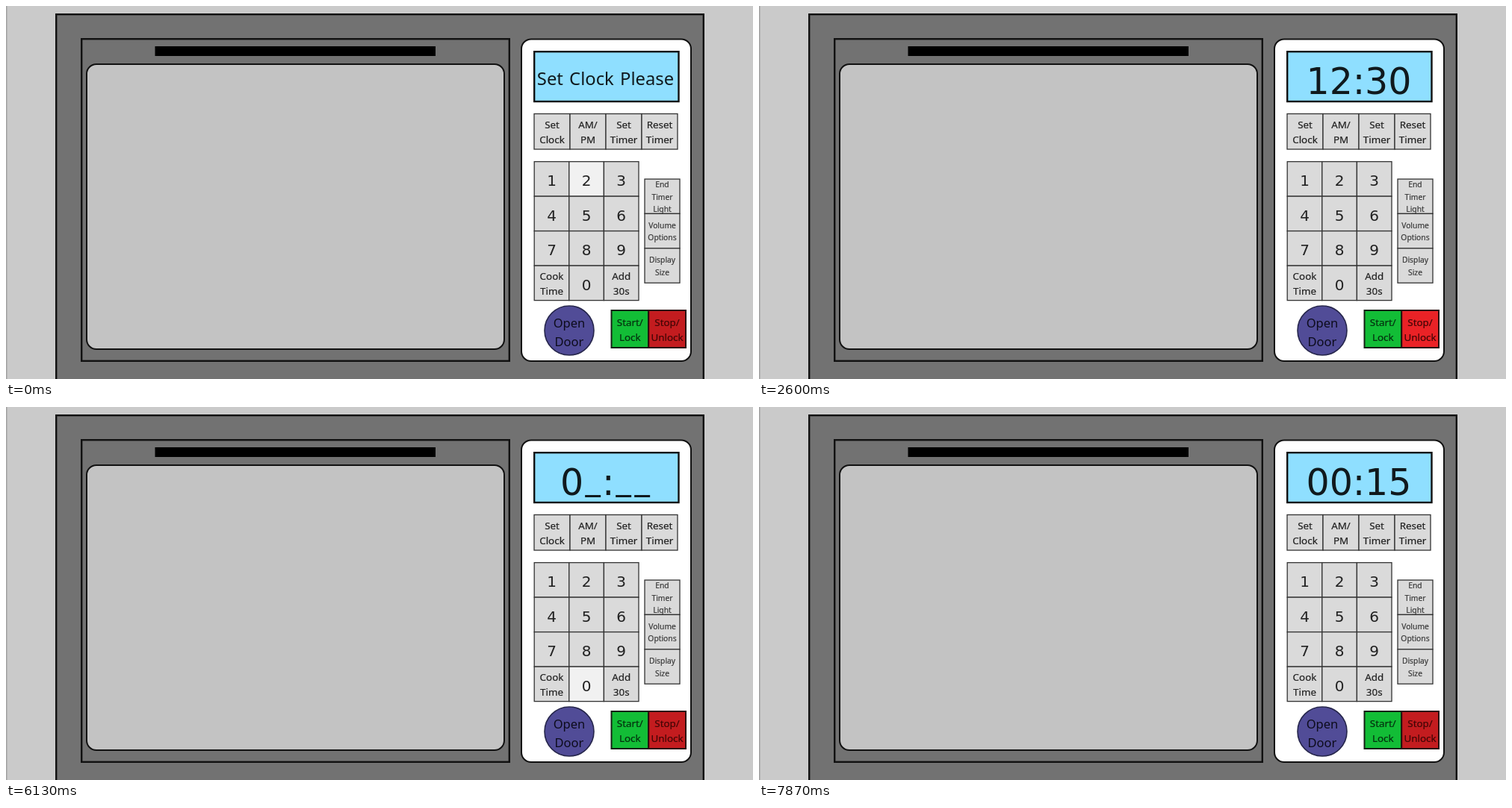
An HTML page that plays this animation: 1000x500 px, repeating every 8000 ms.

```html
<!DOCTYPE html>
<html lang="en">
<head>
<meta charset="utf-8">
<title>Microwave panel</title>
<style>
html, body { margin: 0; width: 100%; height: 100%; overflow: hidden; background: #cacaca; }
svg { display: block; width: 1000px; height: 500px; }
text { text-anchor: middle; font-family: "Noto Sans", "Open Sans", sans-serif; fill: #222; }
.num { font-family: "DejaVu Sans", sans-serif; }
#screen text { fill: #10191d; }
</style>
</head>
<body>
<svg id="stage" viewBox="0 0 1000 500">
  <rect width="1000" height="500" fill="#cacaca"/>
  <rect width="1.5" height="500" fill="#a2a2a2"/>
  <g stroke="#111" stroke-width="2.4">
    <rect x="67.2" y="11.2" width="866.6" height="500" fill="#727272"/>
    <rect x="101.2" y="44.2" width="572.6" height="431.6" fill="#727272"/>
    <rect x="108" y="78" width="559" height="382" rx="13" fill="#c3c3c3" stroke-width="2"/>
    <rect x="690" y="44.5" width="227" height="431.5" rx="13" fill="#fff" stroke-width="2"/>
    <rect x="707.2" y="61.2" width="193.3" height="66.8" fill="#8fdfff"/>
  </g>
  <rect x="199.5" y="54" width="375.5" height="13" fill="#000"/>
  <g id="keys"></g>
  <g id="screen"></g>
</svg>
<script>
const NS = "http://www.w3.org/2000/svg";
const LOOP = 8000;
const keysG = document.getElementById("keys");
const screenG = document.getElementById("screen");
const keys = {};

function add(parent, tag, attrs, content) {
  const el = document.createElementNS(NS, tag);
  for (const k in attrs) el.setAttribute(k, attrs[k]);
  if (content) el.textContent = content;
  parent.appendChild(el);
  return el;
}

function label(parent, str, x, y, size, extra) {
  return add(parent, "text", { x, y, "font-size": size, ...extra }, str);
}

// Each key keeps its idle and hover fill; the name is its label without spaces.
function key(str, x, y, w, h, opt = {}) {
  const { size = 13.4, gap = 20, base = 0, idle = "#dadada", lit = "#f1f1f1",
    ink = "#222", edge = "#333", line = 1.3, cls = "" } = opt;
  const shape = add(keysG, "rect", { x, y, width: w, height: h, fill: idle, stroke: edge, "stroke-width": line });
  const lines = str.split(" ");
  lines.forEach((s, i) => {
    const dy = (i - (lines.length - 1) / 2) * gap;
    label(keysG, s, x + w / 2, y + h / 2 + dy + size * 0.37 + base, size,
      { class: cls, style: `fill:${ink};stroke:${ink};stroke-width:${cls ? 0 : 0.2}` });
  });
  keys[lines.join("")] = { shape, idle, lit };
}

["Set Clock", "AM/ PM", "Set Timer", "Reset Timer"].forEach((s, i) =>
  key(s, 707 + i * 48, 144.5, 48, 47.5, { base: 0.8 }));

["1", "2", "3", "4", "5", "6", "7", "8", "9", "Cook Time", "0", "Add 30s"].forEach((s, i) => {
  const x = 707.2 + (i % 3) * 46.6, y = 208.6 + Math.floor(i / 3) * 46.5;
  key(s, x, y, 46.6, 46.5, s.length > 1 ? { base: 1 } : { size: 20, base: 2, cls: "num" });
});

["End Timer Light", "Volume Options", "Display Size"].forEach((s, i) =>
  key(s, 855, 232 + i * 46.4, 47, 46.4, { size: 10.3, gap: 16.4, base: 0.7, ink: "#3a3a3a" }));

add(keysG, "circle", { cx: 754, cy: 435, r: 33, fill: "#514c97", stroke: "#26264c", "stroke-width": 1.6 });
label(keysG, "Open", 754, 430.5, 16.5, { style: "fill:#0d0c1c" });
label(keysG, "Door", 754, 455.5, 16.5, { style: "fill:#0d0c1c" });

const pair = { base: 1.5, line: 2 };
key("Start/ Lock", 810.5, 408, 49.7, 50, { ...pair, idle: "#12bd36", lit: "#18e844", ink: "#05300f", edge: "#142014" });
key("Stop/ Unlock", 860.2, 408, 49.8, 50, { ...pair, idle: "#c31c1f", lit: "#ea2226", ink: "#430707", edge: "#2a0e0e" });

// [start time, value]
const hovers = [
  [0, "2"], [70, ""], [130, "SetClock"], [470, "1"], [870, "2"], [1270, "3"],
  [1870, "6"], [1930, "9"], [2000, "8"], [2070, "0"],
  [2470, "Add30s"], [2530, "Start/Lock"], [2600, "Stop/Unlock"], [2870, "Start/Lock"],
  [3470, "Stop/Unlock"], [3530, ""], [3600, "DisplaySize"], [3670, "VolumeOptions"],
  [3730, "EndTimerLight"], [3800, "3"], [4330, "CookTime"], [5130, "0"],
  [6870, "8"], [7000, "5"], [7070, "2"], [7130, "1"],
  [7400, "4"], [7470, "5"], [7670, "8"], [7730, "9"], [7800, "Add30s"], [7870, ""]
];
const screens = [
  [0, "Set Clock Please"], [270, "__:__"], [730, "1_:__"], [1070, "12:__"],
  [1670, "12:3_"], [2330, "12:30"], [3070, "12:30 AM"], [4930, "__:__"],
  [6070, "0_:__"], [6470, "00:__"], [7270, "00:1_"], [7600, "00:15"]
];

function at(track, t) {
  let v = track[0][1];
  for (const [start, value] of track) if (t >= start) v = value;
  return v;
}

function drawDigits(str) {
  const advance = c => c === "_" ? 25 : c === ":" ? 16 : 31.3;
  let x = 803 - [...str].reduce((sum, c) => sum + advance(c), 0) / 2;
  for (const c of str) {
    const w = advance(c);
    if (c === "_") add(screenG, "rect", { x: x + 2, y: 118, width: 21, height: 3, fill: "#10191d" });
    else label(screenG, c, x + w / 2, 118.2, 49, { class: "num" });
    x += w;
  }
}

function drawScreen(str) {
  screenG.textContent = "";
  if (str.startsWith("Set")) {
    label(screenG, str, 802.5, 105.8, 23.8, { "word-spacing": 2 });
  } else if (str.endsWith("AM")) {
    label(screenG, str.slice(0, 5), 764, 113, 36.5, { class: "num" });
    label(screenG, "AM", 866, 113, 36, { class: "num" });
  } else {
    drawDigits(str);
  }
}

let shownText = null;
function render(t) {
  const hover = at(hovers, t), str = at(screens, t);
  for (const name in keys) {
    const k = keys[name];
    k.shape.setAttribute("fill", name === hover ? k.lit : k.idle);
  }
  if (str !== shownText) drawScreen(shownText = str);
}

const began = performance.now();
function tick() {
  render((performance.now() - began) % LOOP);
  requestAnimationFrame(tick);
}
tick();
</script>
</body>
</html>
```
